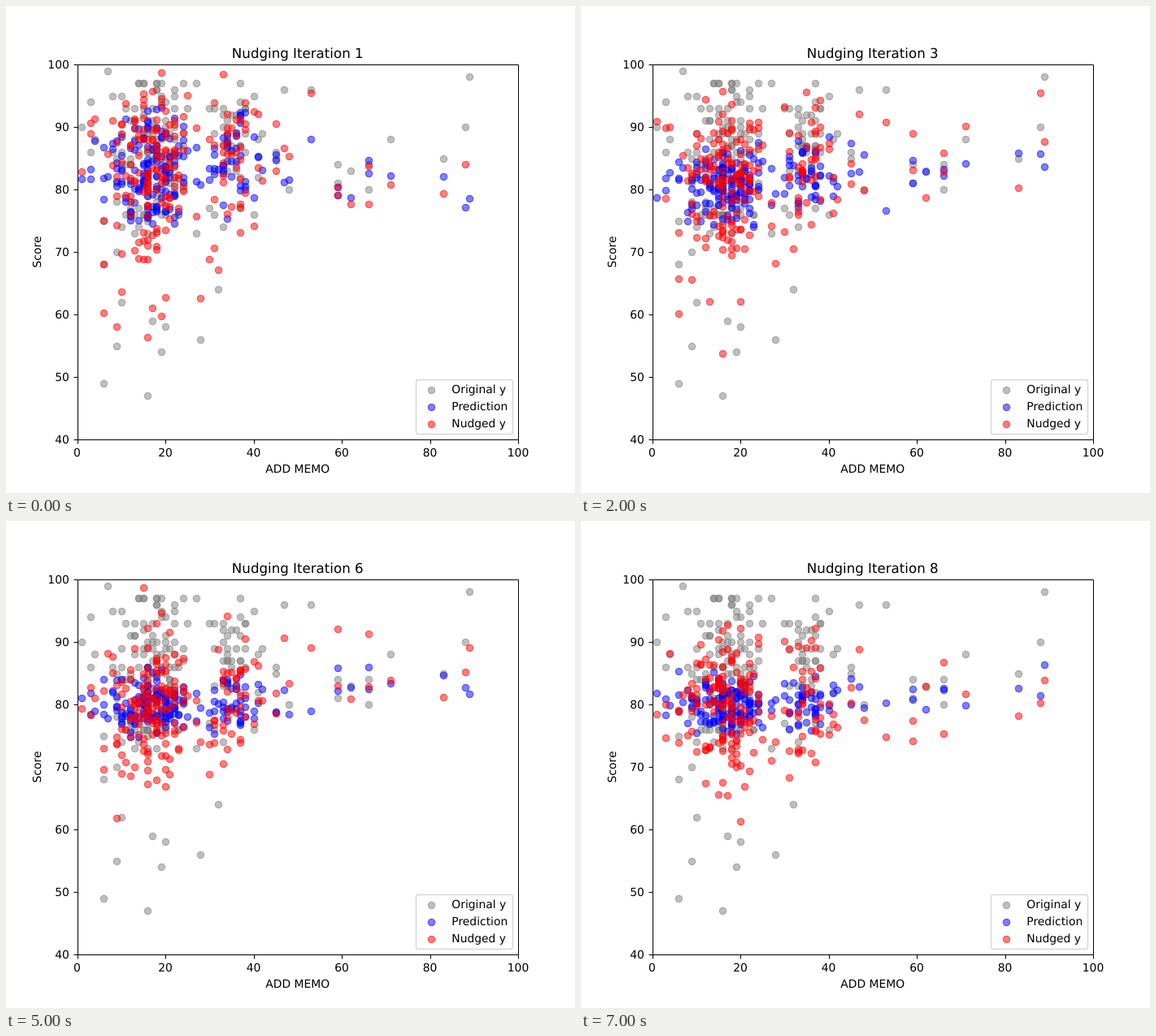
Write an HTML page that moves like this. It is 700x600 px and loops after 8000 ms.

```html
<!DOCTYPE html>
<html lang="en">
<head>
<meta charset="utf-8">
<title>Nudging iterations</title>
<style>
  html, body { margin: 0; width: 100%; height: 100%; overflow: hidden; background: #fff; }
  svg { display: block; width: 700px; height: 600px; }
  text { font: 13.89px "DejaVu Sans", sans-serif; text-rendering: geometricPrecision; }
  .title { font-size: 16.67px; }
  .mid { text-anchor: middle; }
  .end { text-anchor: end; }
  circle { fill-opacity: .5; stroke-opacity: .5; stroke-width: 1.39px; }
  .grey { fill: #808080; stroke: #808080; }
  .blue { fill: #00f; stroke: #00f; }
  .red { fill: #f00; stroke: #f00; }
  .axes { fill: none; stroke: #000; }
  .step { visibility: hidden; animation: show 8s step-end infinite; }
  @keyframes show {
    0% { visibility: visible; }
    12.5%, 100% { visibility: hidden; }
  }
</style>
</head>
<body>
<svg viewBox="0 0 700 600">
  <clipPath id="plot"><rect x="87.5" y="72" width="542.5" height="462"/></clipPath>
  <g id="base" clip-path="url(#plot)"></g>
  <g id="steps"></g>
  <path class="axes" d="M88.5 72.5H630.5V534.5H88.5Z"/>
  <g id="ticks"></g>
  <text class="mid" x="358.75" y="575">ADD MEMO</text>
  <text class="mid" transform="translate(43 303) rotate(-90)">Score</text>
  <rect x="504.5" y="460.5" width="119" height="67" rx="3" fill="#fff" stroke="#d6d6d6" stroke-width="1.39"/>
  <g id="legend"></g>
</svg>
<script>
const $ = id => document.getElementById(id);
const px = x => 87.5 + x * 5.425;
const py = y => 534 - (y - 40) * 7.7;
const snap = v => Math.round(v) + .5;
const dot = (x, y, cls) => `<circle class="${cls}" cx="${snap(x)}" cy="${snap(y)}" r="4.17"/>`;
const plot = (points, cls) => points.map(([x, y]) => dot(px(x), py(y), cls)).join('');

let seed = 20;
const rand = () => {
  seed = (seed + 0x6D2B79F5) | 0;
  let t = Math.imul(seed ^ (seed >>> 15), seed | 1);
  t ^= t + Math.imul(t ^ (t >>> 7), t | 61);
  return ((t ^ (t >>> 14)) >>> 0) / 4294967296;
};
const normal = (mean, sd) => mean + sd * 2 * (rand() + rand() + rand() - 1.5);

// Points that stand clear of the cloud
const points = [
  [1, 90], [3, 94], [3, 86], [4, 88], [6, 75], [6, 68], [7, 99], [8, 95],
  [6, 49], [9, 55], [10, 62], [16, 47], [17, 59], [19, 54], [20, 58], [28, 56], [32, 64],
  [47, 96], [48, 80], [53, 96], [59, 84], [59, 81], [62, 83], [66, 84], [66, 80],
  [71, 88], [83, 85], [88, 90], [89, 98]
];

// A main cluster, a smaller one beside it and a thin tail
const cloudX = () => {
  const r = rand();
  if (r < .72) return 7 + (rand() + rand()) * 10.5;
  return r < .95 ? 30 + rand() * 8 : 39 + rand() * 7;
};
for (let i = 0; i < 168; i++) {
  points.push([Math.round(cloudX()), Math.round(Math.min(97, normal(85.5, 6.8)))]);
}

// Predictions settle near 80; nudged scores lean from there towards the first score
const drawStep = i => {
  const early = .6 ** i;
  const lean = .75 * .8 ** i;
  const blue = points.map(([x]) =>
    [x, normal(79.8 + 3.8 * early + Math.max(0, x - 30) * .07 * (1 - early), 2.2 + 2 * early)]);
  const red = points.map(([x, y], k) => {
    const p = blue[k][1];
    return [x, p + lean * (y - p) + normal(-.8, 5.5 - early)];
  });
  return `<g class="step" style="animation-delay:${i - 8}s">
    <g clip-path="url(#plot)">${plot(blue, 'blue')}${plot(red, 'red')}</g>
    <text class="title mid" x="358.75" y="64">Nudging Iteration ${i + 1}</text></g>`;
};

$('base').innerHTML = plot(points, 'grey');
$('steps').innerHTML = Array.from({ length: 8 }, (_, i) => drawStep(i)).join('');

let ticks = '';
for (let v = 0; v <= 100; v += 20) {
  const x = px(v);
  ticks += `<path class="axes" d="M${snap(x)} 534.5v5"/><text class="mid" x="${x}" y="555">${v}</text>`;
}
for (let v = 40; v <= 100; v += 10) {
  const y = py(v);
  ticks += `<path class="axes" d="M88.5 ${snap(y)}h-5"/><text class="end" x="77.8" y="${Math.round(y) + 5}">${v}</text>`;
}
$('ticks').innerHTML = ticks;

$('legend').innerHTML = [['Original y', 'grey'], ['Prediction', 'blue'], ['Nudged y', 'red']]
  .map(([name, cls], i) => {
    const y = 473 + i * 21;
    return dot(523, y, cls) + `<text x="548.3" y="${y + 4}">${name}</text>`;
  }).join('');
</script>
</body>
</html>
```
